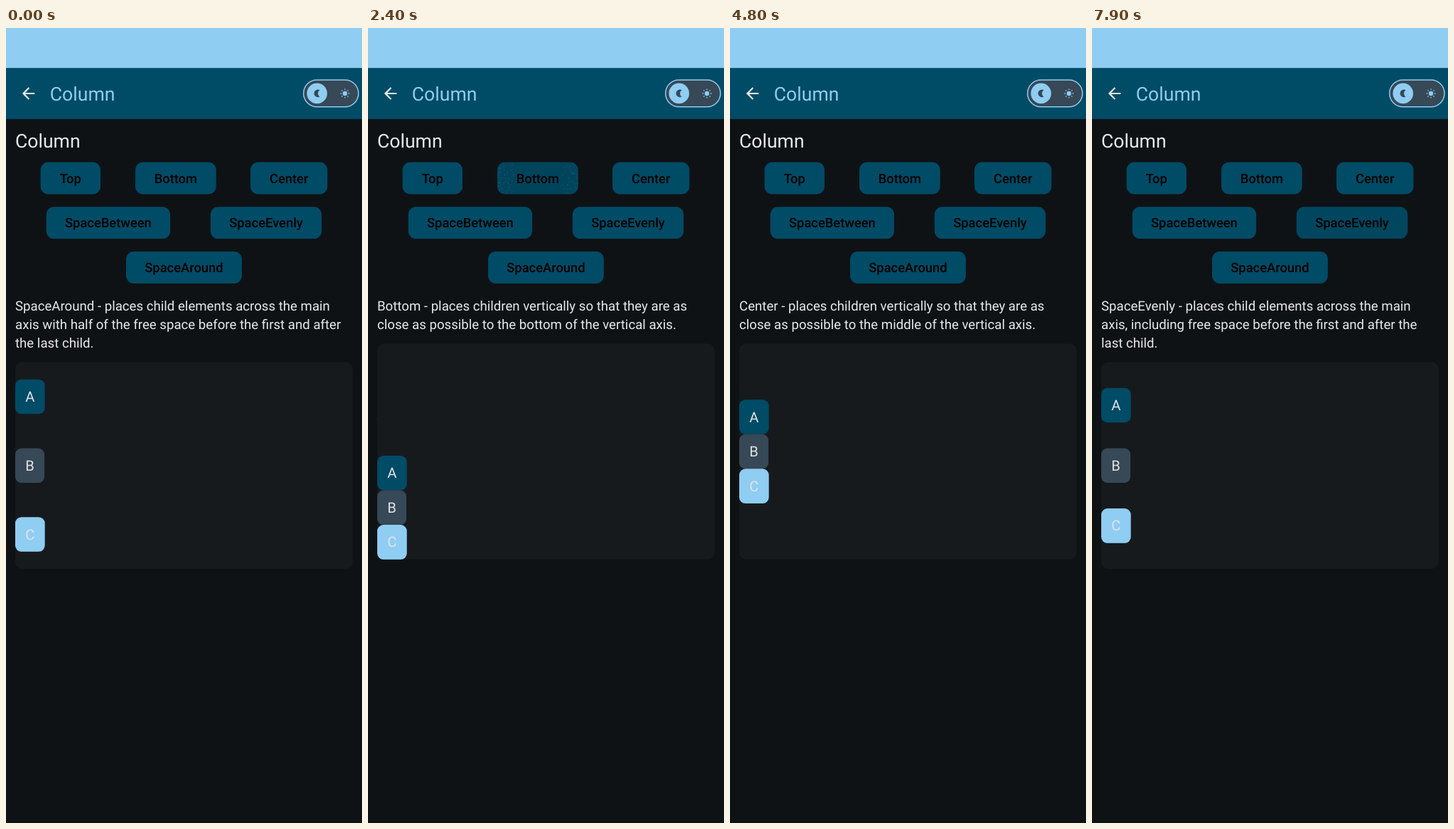
Recreate the animation shown at these times as an HTML page. Size 501x1117 px, loop 8000 ms.

```html
<!DOCTYPE html>
<html lang="en">
<head>
<meta charset="utf-8">
<title>Column</title>
<style>
  html, body { margin: 0; width: 100%; height: 100%; overflow: hidden; background: #0f1215; }
  svg { display: block; width: 501px; height: 1117px; }
  text { font-family: Roboto, sans-serif; text-rendering: geometricPrecision; fill: #e7e9eb; white-space: pre; }
  .title { font-size: 26.6px; }
  .label { font-size: 18.35px; font-weight: 500; text-anchor: middle; fill: #000; }
  .body { font-size: 18.65px; }
  .letter { font-size: 20.2px; text-anchor: middle; fill: #e1e3e6; }
</style>
</head>
<body>
<svg id="stage" viewBox="0 0 501 1117">
  <defs>
    <radialGradient id="shade">
      <stop offset="0" stop-color="#000"/>
      <stop offset=".7" stop-color="#000"/>
      <stop offset="1" stop-color="#000" stop-opacity="0"/>
    </radialGradient>
  </defs>
  <rect width="501" height="1117" fill="#0f1215"/>
  <rect width="501" height="57" fill="#8fcdf2"/>
  <rect y="56.2" width="501" height="71.7" fill="#004b66"/>
  <path transform="translate(18.5 78.9) scale(1.0925)" fill="#e7e9eb"
    d="M20 11H7.83l5.59-5.59L12 4l-8 8 8 8 1.41-1.41L7.83 13H20z"/>
  <text class="title" x="61.8" y="101.6" style="fill:#8fcdf2">Column</text>
  <rect x="418.7" y="72.9" width="77.3" height="37.8" rx="18.9" fill="#374856" stroke="#8fcdf2" stroke-width="1.5"/>
  <circle cx="437.7" cy="91.9" r="14.3" fill="#8fcdf2"/>
  <path d="M441.6 87.2A5.4 5.4 0 1 0 441.6 96.6A5.6 5.6 0 0 1 441.6 87.2Z" fill="#374856"/>
  <circle cx="477" cy="92" r="3.2" fill="#8fcdf2"/>
  <g id="rays" stroke="#8fcdf2" stroke-width="1.3" stroke-linecap="round"></g>
  <text class="title" x="13" y="167.6">Column</text>
  <g id="buttons"></g>
  <g id="lines"></g>
  <rect id="panel" x="13" width="474.8" rx="10" fill="#171a1d"/>
  <g id="boxes"></g>
</svg>
<script>
const LOOP = 8000, STEP = 100, BOX = 48.6, LEFT = 13, LINE = 26.2;
const $ = id => document.getElementById(id);

function set(el, attrs) {
  for (const key in attrs) el.setAttribute(key, attrs[key]);
}

function add(parent, tag, attrs, text) {
  const el = document.createElementNS('http://www.w3.org/2000/svg', tag);
  set(el, attrs);
  if (text) el.textContent = text;
  parent.appendChild(el);
  return el;
}

function seeded(seed) {
  return () => (seed = (seed * 16807) % 2147483647) / 2147483647;
}

// free space before the first box and between boxes, as shares of the whole
const modes = {
  Top: { before: 0, between: 0, lines: [
    'Top - places children vertically so that they are as close',
    'as possible to the top of the vertical axis.'] },
  Bottom: { before: 1, between: 0, lines: [
    'Bottom - places children vertically so that they are as',
    'close as possible to the bottom of the vertical axis.'] },
  Center: { before: 1 / 2, between: 0, lines: [
    'Center - places children vertically so that they are as',
    'close as possible to the middle of the vertical axis.'] },
  SpaceBetween: { before: 0, between: 1 / 2, lines: [
    'SpaceBetween - places child elements across the main',
    'axis without free space before first and after the last',
    'child.'] },
  SpaceEvenly: { before: 1 / 4, between: 1 / 4, lines: [
    'SpaceEvenly - places child elements across the main',
    'axis, including free space before the first and after the',
    'last child.'] },
  SpaceAround: { before: 1 / 6, between: 1 / 3, lines: [
    'SpaceAround - places child elements across the main',
    'axis with half of the free space before the first and after',
    'the last child.'] }
};

const presses = [
  [500, 'Top'], [2300, 'Bottom'], [3900, 'Center'],
  [5600, 'SpaceBetween'], [7300, 'SpaceEvenly']
];

for (let i = 0; i < 8; i++)
  add($('rays'), 'path', { d: 'M477 86.6v-.6', transform: `rotate(${i * 45} 477 92)` });

function makeButton(name, x, y, w) {
  const h = 44.8, shape = { x, y, width: w, height: h, rx: 10.9 };
  const g = add($('buttons'), 'g', {});
  add(g, 'rect', { ...shape, fill: '#004b66' });
  const clip = add(g, 'clipPath', { id: 'clip' + name });
  add(clip, 'rect', shape);
  const ink = add(g, 'g', { 'clip-path': `url(#clip${name})` });
  const cx = x + w / 2, cy = y + h / 2;
  const wave = add(ink, 'circle', { cx, cy, r: 0, fill: 'url(#shade)' });
  const glints = add(ink, 'path', { stroke: '#5fa3bd', 'stroke-width': .9, fill: 'none', opacity: 0 });
  add(g, 'text', { class: 'label', x: cx, y: y + 28.9 }, name);
  return { cx, cy, w, h, wave, glints, reach: Math.hypot(w, h) / 2 };
}

const buttons = {};
[
  ['Top', 48.6, 188.6, 84.4], ['Bottom', 182, 188.6, 113.7], ['Center', 344, 188.6, 108.4],
  ['SpaceBetween', 56.7, 251.3, 174.4], ['SpaceEvenly', 287.8, 251.3, 156.4],
  ['SpaceAround', 169, 314.1, 162.9]
].forEach(([name, ...place]) => buttons[name] = makeButton(name, ...place));

const lines = [0, 1, 2].map(i => add($('lines'), 'text', { class: 'body', x: LEFT, y: 396.6 + i * LINE }));

const boxes = [['A', '#004b66', 41.7], ['B', '#374856', 41.1], ['C', '#8fcdf2', 41.7]].map(([letter, fill, width]) => {
  const g = add($('boxes'), 'g', {});
  add(g, 'rect', { x: LEFT, width, height: BOX, rx: 8.7, fill });
  add(g, 'text', { class: 'letter', x: LEFT + width / 2, y: 31.4 }, letter);
  return g;
});

function drawMode(name) {
  const mode = modes[name];
  const top = 391 + mode.lines.length * LINE;
  const height = (1050 - top) / 2;
  const free = height - 3 * BOX;
  lines.forEach((el, i) => el.textContent = mode.lines[i] || '');
  set($('panel'), { y: top, height });
  boxes.forEach((el, i) => {
    const y = top + free * (mode.before + i * mode.between) + i * BOX;
    set(el, { transform: `translate(0 ${y.toFixed(2)})` });
  });
}

function drawRipple(b, age) {
  const on = age > 0 && age < 900;
  const grow = Math.min(1, .7 + age / 900);
  const fade = Math.min(1, (900 - age) / 450);
  set(b.wave, { r: b.reach * grow * 1.45, opacity: on ? .1 * fade : 0 });
  const shine = age > 0 && age < 500 ? .4 * (1 - age / 500) : 0;
  set(b.glints, { opacity: shine });
  if (!shine) return;
  const rand = seeded(age * 31 + Math.round(b.w));
  let d = '';
  for (let i = 0; i < b.w; i++) {
    const side = rand() < .5 ? -1 : 1;
    const x = b.cx + side * b.w / 2 * (1 - .4 * rand() ** 1.5);
    const y = b.cy + (rand() - .5) * b.h;
    d += `M${x.toFixed(1)} ${y.toFixed(1)}h.9`;
  }
  set(b.glints, { d });
}

let shown = -1;
function draw(time) {
  const t = Math.floor(time % LOOP / STEP) * STEP;
  if (t === shown) return;
  shown = t;
  let mode = 'SpaceAround';
  for (const [at, name] of presses) {
    if (t >= at + STEP) mode = name;
    drawRipple(buttons[name], t - at);
  }
  drawMode(mode);
}

const start = performance.now();
function tick() {
  draw(performance.now() - start);
  requestAnimationFrame(tick);
}
tick();
</script>
</body>
</html>
```
